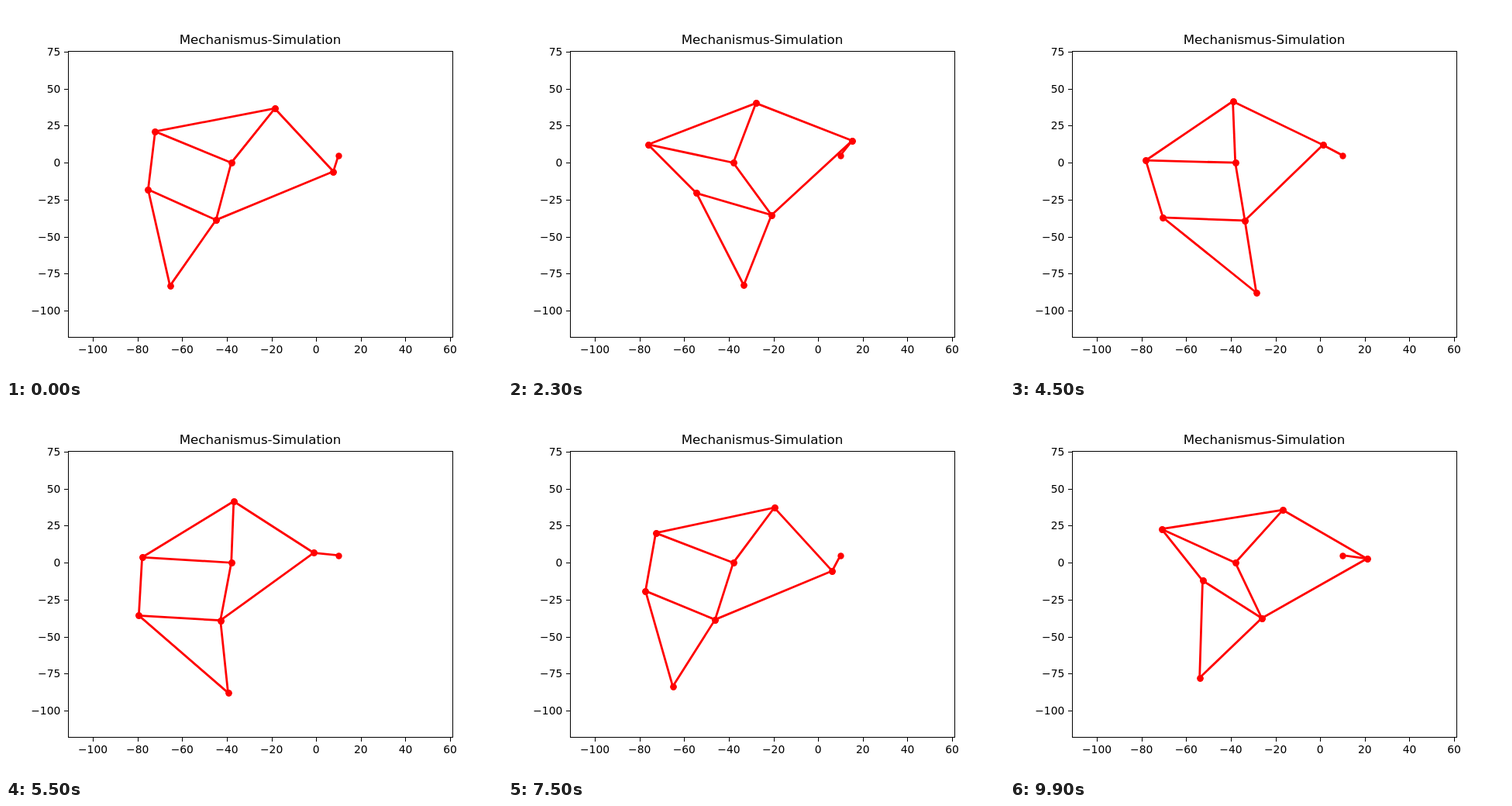
Recreate the animation shown at these times as an HTML page. Size 640x480 px, loop 10 s.

```html
<!DOCTYPE html>
<html lang="de">
<head>
<meta charset="utf-8">
<title>Mechanismus-Simulation</title>
<style>
  html, body { margin: 0; width: 100%; height: 100%; overflow: hidden; background: #fff; }
  svg { display: block; width: 640px; height: 480px; }
  text { font: 13.89px "DejaVu Sans", sans-serif; fill: #000; }
  .title { font-size: 16.67px; }
  .axis { stroke: #000; stroke-width: 1; fill: none; }
  .link { stroke: #f00; stroke-width: 2.78; stroke-linecap: square; }
  .joint { fill: #f00; }
</style>
</head>
<body>
<svg id="stage" viewBox="0 0 640 480"></svg>
<script>
const STEP = 100, COUNT = 100;
const stage = document.getElementById('stage');
const toX = x => 400.2 + 2.8815 * x;
const toY = y => 202.2 - 1.9095 * y;
const snap = v => Math.round(v) + 0.5;

function add(tag, attrs, text) {
  const el = document.createElementNS('http://www.w3.org/2000/svg', tag);
  set(el, attrs);
  if (text) el.textContent = text;
  return stage.appendChild(el);
}

function set(el, attrs) {
  for (const name in attrs) el.setAttribute(name, attrs[name]);
}

const label = v => String(v).replace('-', '\u2212');

function drawAxes() {
  add('rect', { class: 'axis', x: 80.5, y: 58.5, width: 496, height: 369 });
  for (let v = -100; v <= 60; v += 20) {
    const x = toX(v);
    add('path', { class: 'axis', d: `M${snap(x)} 428v5` });
    add('text', { x, y: 448, 'text-anchor': 'middle' }, label(v));
  }
  for (let v = -100; v <= 75; v += 25) {
    const y = snap(toY(v));
    add('path', { class: 'axis', d: `M80 ${y}h-5` });
    add('text', { x: 70.3, y: Math.floor(y) + 5, 'text-anchor': 'end' }, label(v));
  }
  add('text', { class: 'title', x: 328, y: 49, 'text-anchor': 'middle' }, 'Mechanismus-Simulation');
}

// Crank angle in degrees at chosen steps: a quick catch-up, then a lagging turn.
const KNOTS = [
  [0, -101.9], [3, -57], [6, -16.5], [8, 3.5], [11, 21.5], [15, 35.5], [23, 62.05],
  [36, 112.2], [55, 171.5], [66, 206.57], [77, 260], [85, 293.1], [99, 348.3]
];
const gap = i => KNOTS[i + 1][0] - KNOTS[i][0];
const rate = i => (KNOTS[i + 1][1] - KNOTS[i][1]) / gap(i);

function slope(i) {
  if (i === 0) return rate(0);
  if (i === KNOTS.length - 1) return rate(i - 1);
  return (gap(i - 1) * rate(i) + gap(i) * rate(i - 1)) / (gap(i - 1) + gap(i));
}

function crankAngle(k) {
  let i = 0;
  while (i < KNOTS.length - 2 && k >= KNOTS[i + 1][0]) i++;
  const h = gap(i), u = (k - KNOTS[i][0]) / h, w = 1 - u;
  return w * w * (1 + 2 * u) * KNOTS[i][1] + u * u * (3 - 2 * u) * KNOTS[i + 1][1]
    + h * u * w * (w * slope(i) - u * slope(i + 1));
}

// Point at distance rp from p and rq from q, left (1) or right (-1) of p to q.
function join(p, rp, q, rq, side) {
  const dx = q[0] - p[0], dy = q[1] - p[1], d = Math.hypot(dx, dy);
  const a = (rp * rp - rq * rq + d * d) / (2 * d);
  const h = side * Math.sqrt(Math.max(0, rp * rp - a * a));
  return [p[0] + (a * dx - h * dy) / d, p[1] + (a * dy + h * dx) / d];
}

function solve(k) {
  const angle = crankAngle(k) * Math.PI / 180, r = Math.sqrt(125);
  const axle = [10, 5], pivot = [-38, 0];
  const crank = [axle[0] + r * Math.cos(angle), axle[1] + r * Math.sin(angle)];
  const top = join(pivot, 41.5, crank, 50, 1);
  const left = join(pivot, 40.1, top, 55.8, 1);
  const low = join(pivot, 39.3, crank, 61.9, -1);
  const knee = join(left, 39.4, low, 36.7, -1);
  const foot = join(knee, 65.7, low, 49, -1);
  return { axle, pivot, crank, top, left, low, knee, foot };
}

drawAxes();

const links = [
  'axle crank', 'crank top', 'pivot top', 'top left', 'pivot left', 'crank low',
  'pivot low', 'left knee', 'low knee', 'knee foot', 'low foot'
].map(pair => ({
  ends: pair.split(' '),
  line: add('line', { class: 'link' }),
  dots: [0, 1].map(() => add('circle', { class: 'joint', r: 4.17 }))
}));

function pose(k) {
  const points = solve(k);
  for (const { ends, line, dots } of links) {
    const [[x1, y1], [x2, y2]] = ends.map(name => [toX(points[name][0]), toY(points[name][1])]);
    set(line, { x1, y1, x2, y2 });
    set(dots[0], { cx: snap(x1), cy: snap(y1) });
    set(dots[1], { cx: snap(x2), cy: snap(y2) });
  }
}

const start = performance.now();
let shown = 0;
pose(0);

function tick() {
  const k = Math.floor((performance.now() - start) / STEP) % COUNT;
  if (k !== shown) pose(shown = k);
  requestAnimationFrame(tick);
}
requestAnimationFrame(tick);
</script>
</body>
</html>
```
